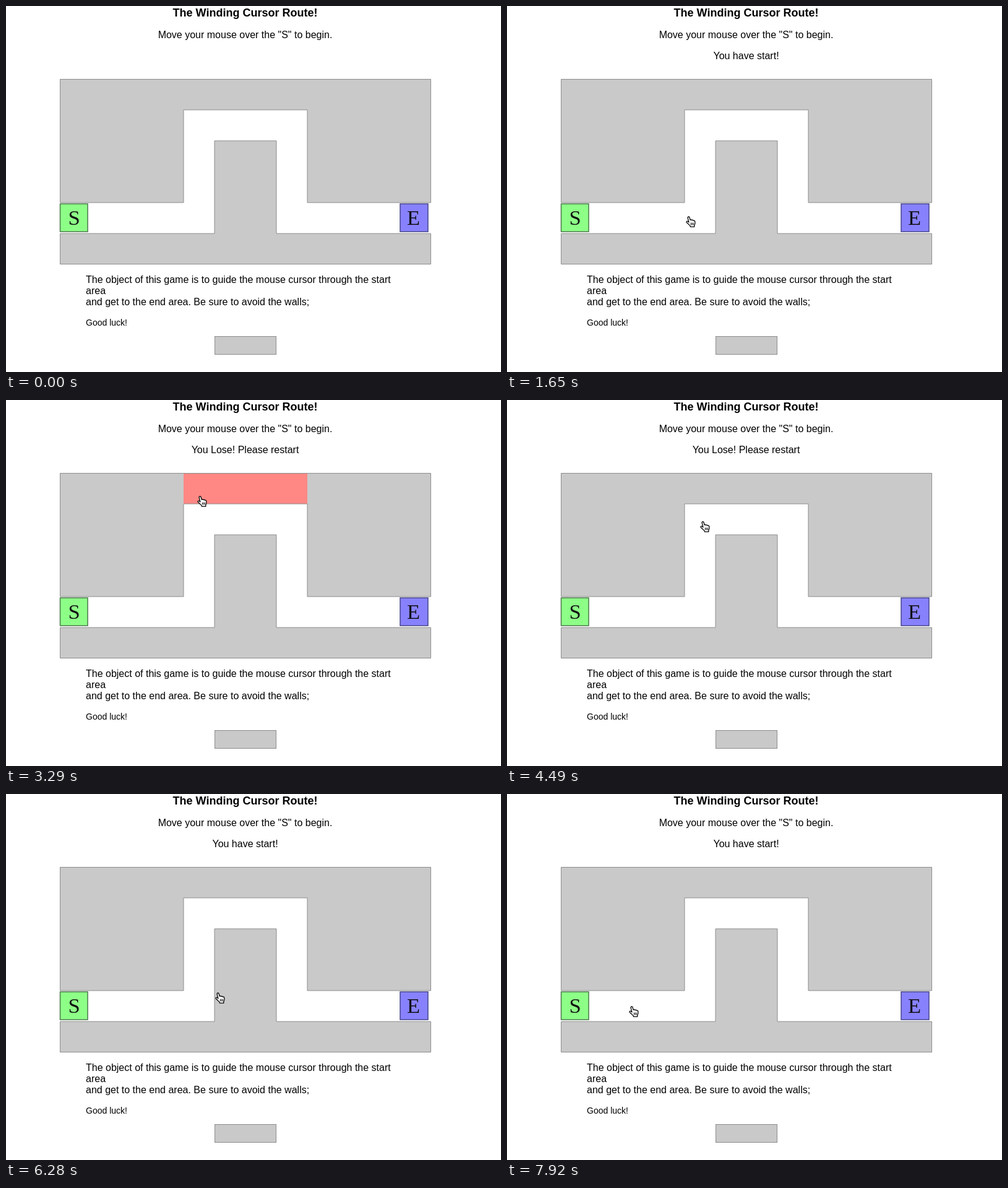
Write an HTML page that moves like this. It is 800 px wide and 592 px high and loops after 8000 ms.

```html
<!DOCTYPE html>
<html lang="en">
<head>
<meta charset="utf-8">
<title>Cursor maze</title>
<style>
  html, body { margin: 0; width: 100%; height: 100%; overflow: hidden; background: #fff; }
  svg { display: block; width: 800px; height: 592px; font: 16px "Liberation Sans", Arial, sans-serif; }
  .mid { text-anchor: middle; }
  .title { font-size: 18px; font-weight: bold; }
  .small { font-size: 14px; }
  .letter { font: 34.5px "Liberation Serif", Times, serif; text-anchor: middle; fill: #111; }
  .wall { fill: #c9c9c9; }
  .wall.hit { fill: #ff8884; }
  .edge { fill: none; stroke: #8d8d8d; }
  .hand { fill: #fff; stroke: #000; stroke-width: 1.3; stroke-linejoin: round; stroke-linecap: round; }
</style>
</head>
<body>
<svg viewBox="0 0 800 592">
  <text class="mid title" x="386.5" y="17">The Winding Cursor Route!</text>
  <text class="mid" x="386.5" y="52">Move your mouse over the "S" to begin.</text>
  <text class="mid" id="status" x="386.5" y="86"></text>

  <rect id="maze" x="87" y="118" width="600" height="300" fill="#fff"/>
  <rect class="wall" x="87" y="118" width="200" height="200"/>
  <rect class="wall" x="287" y="118" width="200" height="50"/>
  <rect class="wall" x="487" y="118" width="200" height="200"/>
  <rect class="wall" x="337" y="218" width="100" height="150"/>
  <rect class="wall" x="87" y="368" width="600" height="50"/>
  <path class="edge" d="M87.5 118.5H686.5V318H487V168H287V318H87.5Z
    M87.5 368H337V218H437V368H686.5V417.5H87.5Z"/>

  <rect id="start" x="87.5" y="320" width="44.5" height="45" fill="#8dff87" stroke="#4b7a4b" stroke-width="1.5"/>
  <text class="letter" x="110" y="354">S</text>
  <rect x="637" y="320" width="45" height="45" fill="#8781fd" stroke="#45458a" stroke-width="1.5"/>
  <text class="letter" x="658.5" y="354">E</text>

  <text x="129" y="448">The object of this game is to guide the mouse cursor through the start</text>
  <text x="129" y="466">area</text>
  <text x="129" y="484">and get to the end area. Be sure to avoid the walls;</text>
  <text class="small" x="129" y="517">Good luck!</text>
  <rect x="337.5" y="534.5" width="99" height="29" fill="#c9c9c9" stroke="#8d8d8d"/>

  <g id="hand" class="hand">
    <path d="M3.1 2.6C2.7.5 5.3.1 5.9 1.8L7.3 6.2C7.7 5.3 9.3 5.5 9.7 6.5C10.3 5.7 11.8 6.1 12.1 7.1
      C13.1 6.7 14.4 7.2 14.8 8.7C15.2 11 15 13 13.9 14.6L13.7 17.2H7.4L7 15.6
      C5.2 14 3.6 11.8 1.2 9.9C.5 8.5 2 7.5 3.4 8.5L4.9 9.8Z"/>
    <path d="M8.4 11V14M10.4 11V14M12.4 11V14" stroke-width="1"/>
  </g>
</svg>
<script>
const LOOP = 8000, ENTER = 600, STEP = 149.3;
const $ = id => document.getElementById(id);
const walls = [...document.querySelectorAll(".wall")];

// The pointer's walk, one position per step
const trail = [[20, 341]];
const here = () => trail[trail.length - 1];

function move(steps, to, bend) {
  const from = here();
  const at = (k, axis) => {
    const mid = bend ? bend[axis] : (from[axis] + to[axis]) / 2;
    return Math.round((1 - k) ** 2 * from[axis] + 2 * k * (1 - k) * mid + k * k * to[axis]);
  };
  for (let i = 1; i <= steps; i++) trail.push([at(i / steps, 0), at(i / steps, 1)]);
}
const rest = steps => move(steps, here(), here());

// First try: into the top wall, then out of the maze
move(7, [289, 340]);
rest(1);
move(8, [309, 181], [320, 270]);
move(1, [309, 155]);
rest(6);
move(3, [312, 196]);
move(5, [-4, 400], [80, 490]);
// Second try: into the pillar, then round to the start again
move(1, [0, 370]);
move(6, [338, 321], [150, 345]);
move(1, [344, 319]);
rest(2);
move(5, [0, 455], [240, 461]);
move(3, [197, 343], [40, 350]);

function inside([x, y], box) {
  const [left, top, width, height] = ["x", "y", "width", "height"].map(a => +box.getAttribute(a));
  return x >= left && x <= left + width && y >= top && y <= top + height;
}

// The game's rules; it answers each position one step later
const START = "You have start!", LOSE = "You Lose! Please restart";
let state = { text: "", hit: null };
const states = trail.map(([x, y]) => {
  const shown = state, tip = [x + 5, y + 1];
  let { text, hit } = state;
  if (hit && !inside(tip, hit)) hit = null;
  if (inside(tip, $("start"))) text = START;
  else if (text === START) {
    hit = walls.find(w => inside(tip, w)) || null;
    if (hit) text = LOSE;
  } else if (!inside(tip, $("maze"))) text = "";
  state = { text, hit };
  return shown;
});

function draw(time) {
  const step = Math.floor((time % LOOP - ENTER) / STEP);
  const i = Math.min(Math.max(step, 0), trail.length - 1);
  $("hand").setAttribute("visibility", step < 0 ? "hidden" : "visible");
  $("hand").setAttribute("transform", `translate(${trail[i]})`);
  $("status").textContent = states[i].text;
  walls.forEach(w => w.classList.toggle("hit", w === states[i].hit));
}

const begin = performance.now();
function tick() {
  draw(performance.now() - begin);
  requestAnimationFrame(tick);
}
tick();
</script>
</body>
</html>
```
